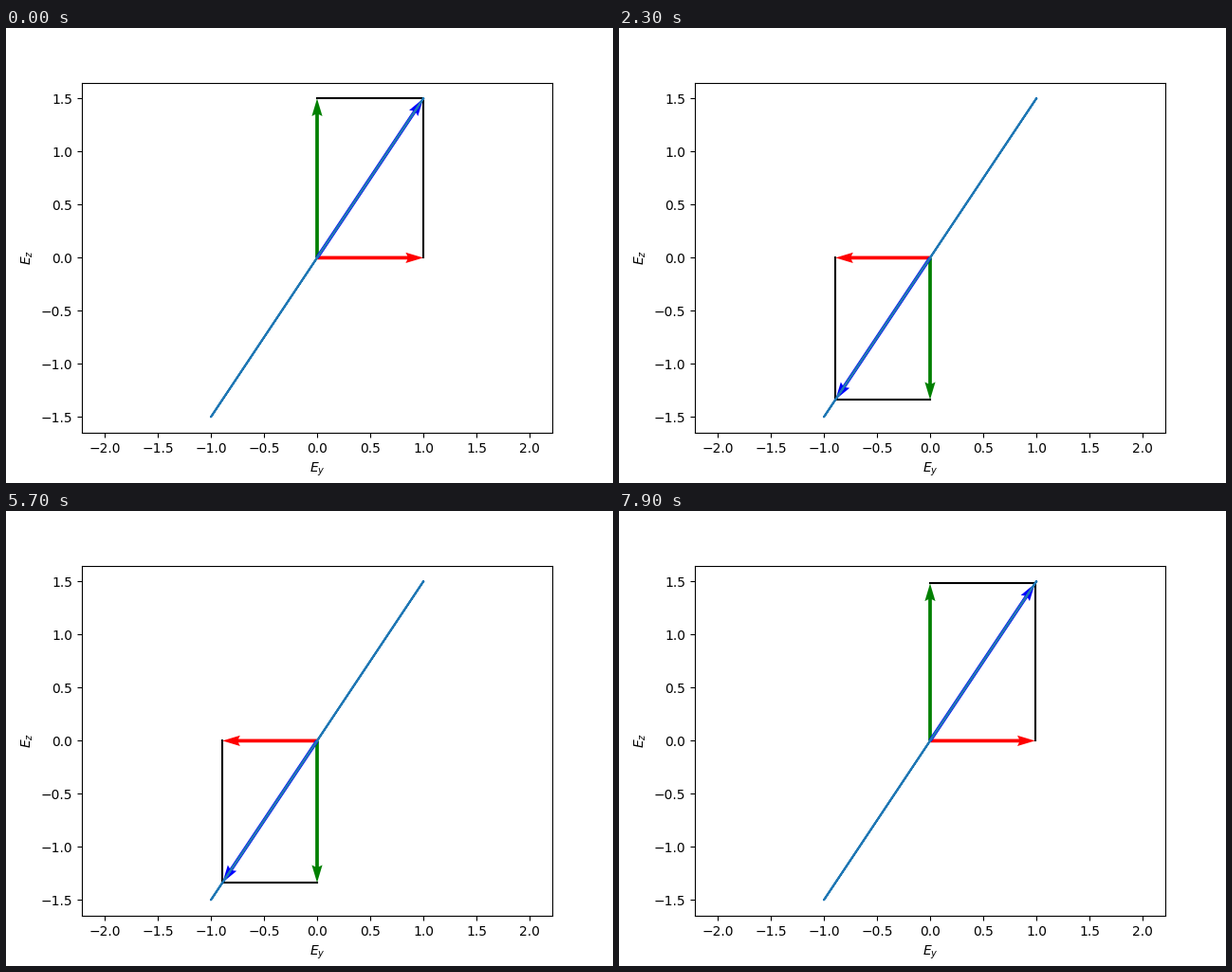
A matplotlib script that plays this animation: 640 px wide and 480 px high, repeating every 8000 ms.

```python
import numpy as np
import matplotlib.pyplot as plt
from matplotlib.animation import FuncAnimation

FRAMES = 80
PERIOD = 40  # frames per oscillation
AMP_Y, AMP_Z = 1.0, 1.5

fig, ax = plt.subplots(figsize=(6.4, 4.8), dpi=100)
y_lim = 1.65
x_lim = y_lim * 496 / 369.6  # equal scale on both axes
ax.set_xlim(-x_lim, x_lim)
ax.set_ylim(-y_lim, y_lim)
ax.set_xlabel("$E_y$")
ax.set_ylabel("$E_z$")


def arrow(color):
    return ax.quiver(0, 0, 1, 1, color=color, angles="xy",
                     scale_units="xy", scale=1)


red, green, blue = (arrow(c) for c in ("red", "green", "blue"))
box, = ax.plot([], [], color="black", lw=1.5)

phase = np.linspace(0, 2 * np.pi, PERIOD + 1)
ax.plot(AMP_Y * np.cos(phase), AMP_Z * np.cos(phase), color="C0", lw=1.5)


def update(i):
    c = np.cos(2 * np.pi * i / PERIOD)
    ey, ez = AMP_Y * c, AMP_Z * c
    red.set_UVC(ey, 0)
    green.set_UVC(0, ez)
    blue.set_UVC(ey, ez)
    box.set_data([ey, ey, 0], [0, ez, ez])
    return red, green, blue, box


anim = FuncAnimation(fig, update, frames=FRAMES, interval=100,
                     repeat=True, repeat_delay=0)
plt.show()
```
